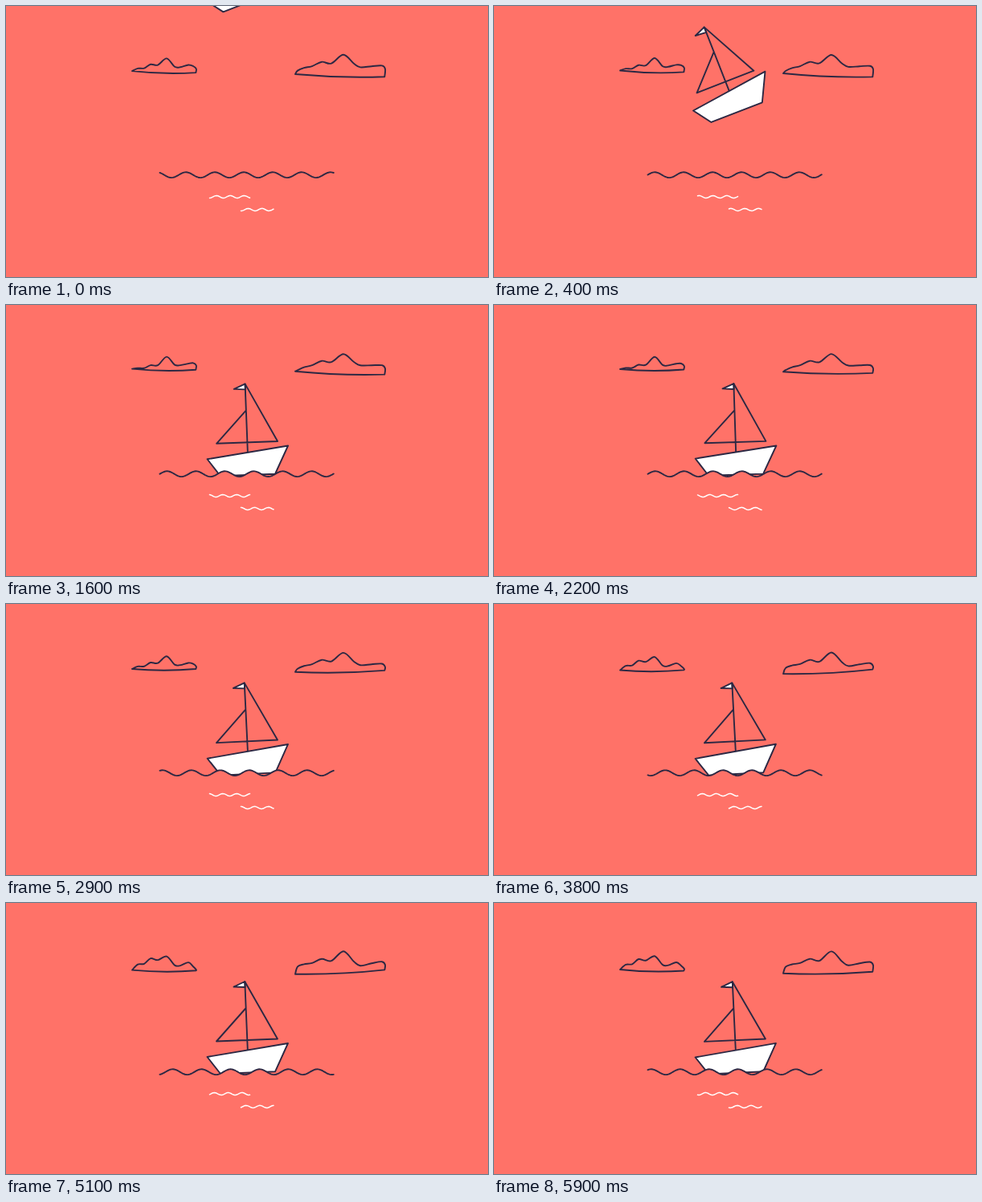
Animation of 600x338 px, one loop 6 s. Source, as an HTML page:

```html
<!DOCTYPE html>
<html lang="en">
<head>
<meta charset="utf-8">
<title>Sailing boat</title>
<style>
  html, body { margin: 0; width: 100%; height: 100%; overflow: hidden; background: #ff7268; }
  svg { display: block; width: 100%; height: 100%; }
  path { fill: none; stroke: #2c2843; stroke-width: 1.9; stroke-linejoin: round; stroke-linecap: round; }
  .white { fill: #fff; }
  .ripple { stroke: #fff; stroke-width: 1.5; }
  ellipse { fill: #2c2843; }
</style>
</head>
<body>
<svg viewBox="0 0 600 338">
  <defs><clipPath id="air"><path id="airShape"/></clipPath></defs>
  <path id="cloudA"/>
  <path id="cloudB"/>
  <g clip-path="url(#air)">
    <g id="boat">
      <path class="white" d="M250.5 192L351 175L335 210.3L267 213Z"/>
      <path class="white" d="M297.3 98L283.5 104.5L297.7 105Z"/>
      <path d="M300.8 183L297.3 98L338 169.5L262 172.5L298.7 131"/>
    </g>
  </g>
  <path id="sea"/>
  <path id="rippleA" class="ripple"/>
  <path id="rippleB" class="ripple"/>
  <ellipse id="dropA" rx="1.7" ry="1.9"/>
  <ellipse id="dropB" rx="1.3" ry="1.8"/>
</svg>
<script>
const LOOP = 6000, STEP = 100, IMPACT = 0.5;
const el = id => document.getElementById(id);
const draw = (id, d) => el(id).setAttribute('d', d);
const f = n => n.toFixed(2);

// Slow swell shared by the clouds: 1 at the peak time, in seconds.
const swell = (t, peak) => Math.cos(2 * Math.PI * (t - peak) / 7);

// Each knot is [x, height above the left end, swing of that height].
const clouds = {
  cloudA: {
    left: t => [157, 81.6 + 2 * swell(t, 5)],
    right: t => [236.3, 82.5 + 2 * swell(t, 5.6)],
    knots: [[164, 4, 3], [172, 4.3, 3.5], [180, 9.5, 5], [189, 8.5, 4], [200, 16, 1],
      [210, 5.5, 0.5], [217, 5, 0.5], [227, 8, 1.5], [233, 5.8, -1.5], [236.8, 2.3, -2]]
  },
  cloudB: {
    left: t => [360, 85.7 + 3 * swell(t, 5)],
    right: t => [471.3, 85 + 3.4 * swell(t, 0.4)],
    knots: [[363, 5.3, 4], [371, 8.7, 3.7], [381, 10.7, 3.2], [393, 16, 3], [405, 14, 2.5], [420, 25, 3.5],
      [433, 13.7, 2], [441, 9, 1.5], [455, 10.5, 3], [468, 11.5, 4], [472, 7.5, 4]]
  }
};

// Smooth curve over the knots, closed by a sagging base.
function cloudPath({ left, right, knots }, t) {
  const a = left(t), z = right(t), m = swell(t, 5);
  const p = [a, ...knots.map(([x, h, s]) => [x, a[1] - h - s * m]), z];
  const at = i => p[Math.max(0, Math.min(p.length - 1, i))];
  let d = 'M' + a.map(f);
  for (let i = 0; i < p.length - 1; i++) {
    const [p0, p1, p2, p3] = [at(i - 1), at(i), at(i + 1), at(i + 2)];
    const c1 = p1.map((v, j) => f(v + (p2[j] - p0[j]) / 6));
    const c2 = p2.map((v, j) => f(v - (p3[j] - p1[j]) / 6));
    d += `C${c1} ${c2} ${p2.map(f)}`;
  }
  return d + `Q${f((a[0] + z[0]) / 2)} ${f((a[1] + z[1]) / 2 + 3.5)} ${a.map(f)}Z`;
}

// Sine line from x0 to x1 with a crest at the given x.
function wave(x0, x1, mid, amp, len, crest) {
  const pts = [], n = Math.ceil((x1 - x0) / 1.5);
  for (let i = 0; i <= n; i++) {
    const x = x0 + (x1 - x0) * i / n;
    pts.push(f(x) + ' ' + f(mid - amp * Math.cos((x - crest) / len * 2 * Math.PI)));
  }
  return pts.join('L');
}

// Accelerating fall, damped bounce, then a gentle sway.
function boatPose(t) {
  const s = t - IMPACT;
  let y, rot;
  if (s < 0) {
    y = -215 * (1 - (t / IMPACT) ** 2);
    rot = -19;
  } else {
    y = 53 * Math.exp(-4 * s) * Math.sin(2 * Math.PI * s);
    rot = -19 * Math.exp(-1.8 * s) * Math.cos(1.48 * s);
  }
  const sway = Math.min(1, Math.max(0, t - 1)) * (1 - Math.cos(2 * Math.PI * (t - 1.6) / 3.5)) / 2;
  return `translate(${f(rot * 0.43)} ${f(y + sway * 0.4)}) rotate(${f(rot - sway * 0.8)} 300.8 183)`;
}

function drop(id, s, x, drift, speed) {
  const y = 212 - speed * s + 350 * s * s;
  el(id).setAttribute('cx', f(x + drift * s));
  el(id).setAttribute('cy', f(y));
  el(id).style.display = s > 0 && y < 209 ? '' : 'none';
}

function render(t) {
  for (const id in clouds) draw(id, cloudPath(clouds[id], t));

  const sea = (a, b) => wave(a, b, 210.7, 3.4, 36, 224 - 59.7 * t);
  const gap = t > 0.5 && t < 1.1 ? 15.5 * Math.sin((t - 0.5) / 0.6 * Math.PI) : 0;
  const full = sea(191.5, 407.8);
  draw('sea', gap
    ? `M${sea(191.5, 267.5 - gap)}M${sea(267.5 + gap, 407.8)}`
    : `M${full}`);
  draw('airShape', `M191.5 -400L${full}L407.8 -400Z`);

  const drift = 17.2 * t / 0.65;
  draw('rippleA', 'M' + wave(253.5, 303.5, 238, 1.5, 17.2, 262 + drift));
  draw('rippleB', 'M' + wave(292.5, 333, 254, 1.5, 17.2, 301.5 + drift));

  el('boat').setAttribute('transform', boatPose(t));
  drop('dropA', t - IMPACT, 267, 10, 195);
  drop('dropB', t - IMPACT, 267, -10, 145);
}

const start = performance.now();
function tick() {
  const ms = (performance.now() - start) % LOOP;
  render(Math.floor(ms / STEP) * STEP / 1000);
  requestAnimationFrame(tick);
}
tick();
</script>
</body>
</html>
```
